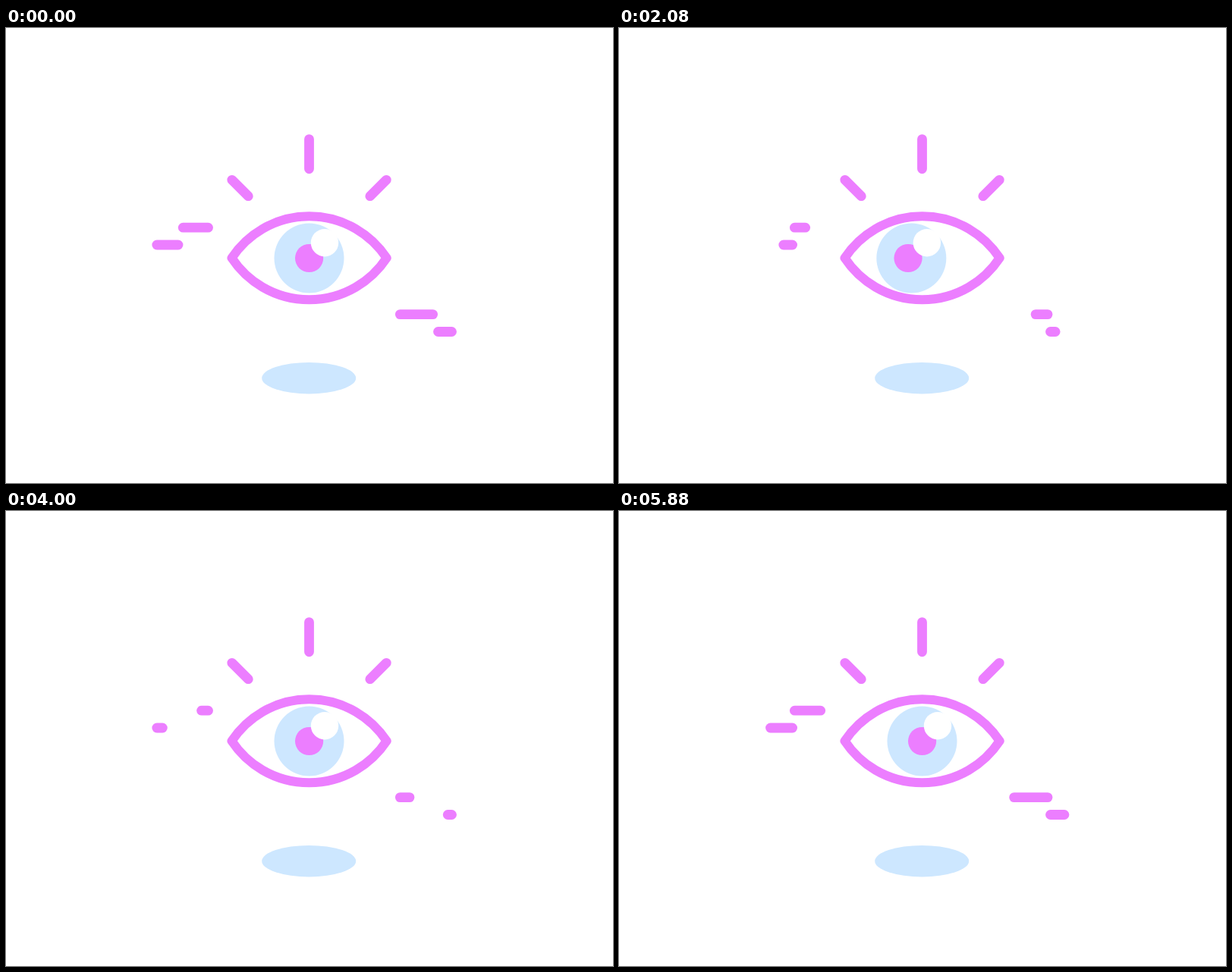
These frames come from a looping animation (800 by 600 pixels, 5.92 s). An HTML page:

```html
<!DOCTYPE html>
<html lang="en">
<head>
<meta charset="utf-8">
<title>Eye</title>
<style>
html, body { margin: 0; width: 100%; height: 100%; overflow: hidden; background: #fff; }
svg { display: block; width: 800px; height: 600px; }
.line { fill: none; stroke: #ec7eff; stroke-width: 12.8; stroke-linecap: round; stroke-linejoin: round; }
.pale { fill: #cde7ff; }
</style>
</head>
<body>
<svg viewBox="0 0 800 600">
  <ellipse class="pale" cx="399.2" cy="461.7" rx="62" ry="20.7"/>
  <circle class="pale" id="iris" cx="399.5" cy="303.5" r="46"/>
  <circle id="pupil" cx="399.6" cy="303.5" r="18.6" fill="#ec7eff"/>
  <circle id="glint" cx="420" cy="283.2" r="18.2" fill="#fff"/>
  <path class="line" style="stroke-width:12" d="M297.5 303.3A122.3 122.3 0 0 1 501.7 303.3A122.3 122.3 0 0 1 297.5 303.3Z"/>
  <path class="line" d="M399.5 146.6V185.8M297.8 200.3L319.3 221.7M501.3 200.3L479.8 221.7"/>
  <g class="line" id="bars"></g>
</svg>
<script>
const LOOP = 5920, CYCLE = LOOP / 2;
const $ = id => document.getElementById(id);
const clamp = x => Math.max(0, Math.min(1, x));
const smooth = (t, a, b) => { const u = clamp((t - a) / (b - a)); return u * u * (3 - 2 * u); };

// Each bar grows from one end to the other, then its tail follows.
const bars = [
  { y: 263.2, from: 231.4, to: 266.5, grow: 1585, bend: 0.2, fade: 1500 },
  { y: 286, from: 228.6, to: 198.8, grow: 1605, bend: 0.2, fade: 1500 },
  { y: 377.6, from: 565, to: 519.3, grow: 1610, bend: 0, fade: 1550 },
  { y: 400.5, from: 568.5, to: 587.5, grow: 1610, bend: 0, fade: 1550 }
];
for (const bar of bars) {
  bar.el = document.createElementNS("http://www.w3.org/2000/svg", "path");
  $("bars").append(bar.el);
}

function drawBar(bar, t) {
  const { y, from, to, grow, bend, fade } = bar;
  const at = p => from + (to - from) * p;
  const tail = (t + 80) / fade;
  const u = (t - grow) / (CYCLE - grow);
  let d = "";
  if (tail < 1) d = `M${at(tail)} ${y}H${to}`;
  else if (u >= 0) d = `M${from} ${y}H${at(u + bend * u * (1 - u))}`;
  bar.el.setAttribute("d", d);
}

// Glance right, then left, then back to the middle.
const glance = (t, reach, leftAt) =>
  reach * (smooth(t, 480, 1200) - 2 * smooth(t, 1440, leftAt) + smooth(t, 2400, 2760));

const shift = (id, x) => $(id).setAttribute("transform", `translate(${x})`);

function draw(now) {
  const t = now % LOOP;
  for (const bar of bars) drawBar(bar, t % CYCLE);
  const x = glance(t, 29.4, 2400);
  shift("iris", x);
  shift("glint", x);
  shift("pupil", glance(t, 34.5, 2370));
}

let start;
function tick(now) {
  start ??= now;
  draw(now - start);
  requestAnimationFrame(tick);
}
draw(0);
requestAnimationFrame(tick);
</script>
</body>
</html>
```
